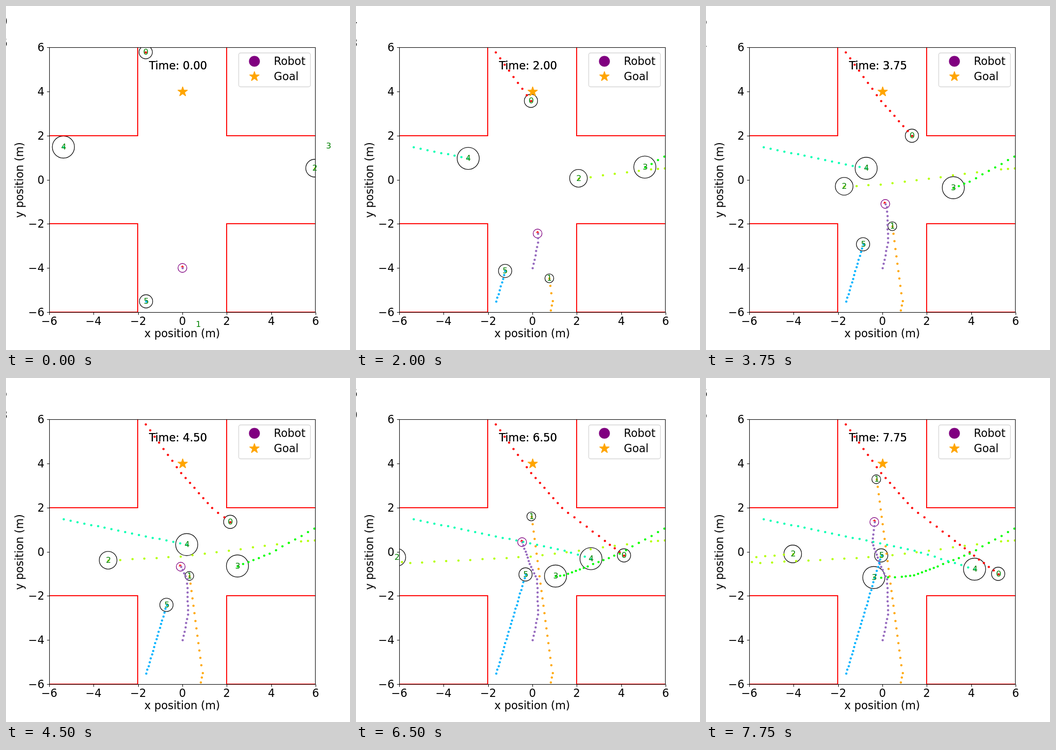
An HTML page with a canvas that plays this animation: 700x700 px, repeating every 8 s.

```html
<!DOCTYPE html>
<html lang="en">
<head>
<meta charset="utf-8">
<title>Crossing simulation</title>
<style>
  html, body { margin: 0; width: 100%; height: 100%; overflow: hidden; background: #fff; }
  canvas { display: block; width: 700px; height: 700px; }
</style>
</head>
<body>
<canvas id="stage" width="700" height="700"></canvas>
<script>
const ctx = document.getElementById('stage').getContext('2d');
const STEP = 250, STEPS = 32;
const LEFT = 88, TOP = 84, RIGHT = 629, BOTTOM = 623;
const sx = x => 359 + x * 45.17;
const sy = y => 353.5 - y * 44.92;

// Each agent walks straight between a few waypoints: [step, x, y].
const agent = (color, r, ...path) => ({ color, r, path });
const robot = agent('#9467bd', 9, [0, 359, 533], [6, 370, 481], [14, 368, 409],
  [18, 355.5, 384], [26, 338, 334], [31, 342.5, 293]);
const hue = h => `hsl(${h} 100% 50%)`;
const humans = [
  agent(hue(0), 13.5, [0, 284.3, 94], [8, 356, 193], [15, 419, 264], [22, 506, 331], [31, 594.5, 398.5]),
  agent(hue(39), 9, [0, 391, 648], [5, 399.5, 599.5], [31, 346.5, 206]),
  agent(hue(78), 18, [0, 628, 330], [2, 600, 332], [12, 354.5, 363], [22, 110, 376],
    [24, 75, 371], [26, 83, 365], [31, 176.5, 358]),
  agent(hue(120), 22.5, [0, 656, 285], [5, 627, 306], [12, 535.5, 357], [18, 471, 382.5],
    [24, 423, 401], [27, 397.5, 404], [31, 341.5, 406]),
  agent(hue(162), 22.5, [0, 116.8, 287], [22, 423.5, 350.5], [31, 546.5, 389]),
  agent(hue(198), 13.5, [0, 285, 601], [31, 356.5, 361])
];

function at({ path }, i) {
  const k = Math.max(1, path.findIndex(p => p[0] >= i));
  const [a, ax, ay] = path[k - 1], [b, bx, by] = path[k];
  const f = (i - a) / (b - a);
  return [ax + (bx - ax) * f, ay + (by - ay) * f];
}

function text(s, x, y, { size = 22.2, align = 'center', color = '#000' } = {}) {
  ctx.font = `${size}px "DejaVu Sans", sans-serif`;
  ctx.textAlign = align;
  ctx.fillStyle = color;
  ctx.fillText(s, x, y);
}

function line(color, width, ...pts) {
  ctx.strokeStyle = color;
  ctx.lineWidth = width;
  ctx.beginPath();
  pts.forEach(([x, y]) => ctx.lineTo(x, y));
  ctx.stroke();
}

function disc(x, y, r, fill) {
  ctx.fillStyle = fill;
  ctx.beginPath();
  ctx.arc(x, y, r, 0, 7);
  ctx.fill();
}

function ring(x, y, r, color) {
  ctx.strokeStyle = color;
  ctx.lineWidth = 1.35;
  ctx.beginPath();
  ctx.arc(x, y, r, 0, 7);
  ctx.stroke();
}

function star(x, y, r = 10.4) {
  ctx.fillStyle = ctx.strokeStyle = '#ffa500';
  ctx.lineWidth = 1.39;
  ctx.lineJoin = 'bevel';
  ctx.beginPath();
  for (let k = 0; k < 10; k++) {
    const a = k * Math.PI / 5, d = k % 2 ? r * 0.382 : r;
    ctx.lineTo(x + d * Math.sin(a), y - d * Math.cos(a));
  }
  ctx.closePath();
  ctx.fill();
  ctx.stroke();
  ctx.lineJoin = 'miter';
}

function walls() {
  for (const [x, edge] of [[268, LEFT], [449, RIGHT]]) {
    line('#f00', 2, [edge, 264], [x, 264], [x, TOP]);
    line('#f00', 2, [edge, 443], [x, 443], [x, BOTTOM], [edge, BOTTOM]);
  }
}

// Trail dots sit on pixel centres.
function trail(a, i) {
  for (let k = 0; k <= i; k++) {
    const [x, y] = at(a, k).map(v => Math.round(v) + 0.5);
    disc(x, y, 2.3, a.color);
  }
}

function arrow(i) {
  const [x, y] = at(robot, i);
  const [px, py] = i ? at(robot, i - 1) : [x, y + 1];
  ctx.save();
  ctx.translate(x, y);
  ctx.rotate(Math.atan2(x - px, py - y));
  line('#f00', 1.3, [0, -1], [0, -4]);
  line('#f00', 1.3, [-2.8, -1.6], [0, -4.4], [2.8, -1.6]);
  ctx.restore();
}

function axes() {
  ctx.strokeStyle = '#000';
  ctx.lineWidth = 1.1;
  ctx.strokeRect(LEFT + 0.5, TOP + 0.5, RIGHT - LEFT, BOTTOM - TOP);
  for (let v = -6; v <= 6; v += 2) {
    const s = String(v).replace('-', '\u2212');
    const x = Math.round(sx(v)), y = Math.round(sy(v));
    line('#000', 1.1, [x + 0.5, BOTTOM + 0.5], [x + 0.5, BOTTOM + 5.5]);
    line('#000', 1.1, [LEFT - 4.5, y + 0.5], [LEFT + 0.5, y + 0.5]);
    text(s, x, 649);
    text(s, 78, y + 8, { align: 'right' });
  }
  text('x position (m)', 358.5, 674);
  ctx.save();
  ctx.translate(35, 354);
  ctx.rotate(-Math.PI / 2);
  text('y position (m)', 0, 0);
  ctx.restore();
}

function legend() {
  ctx.beginPath();
  ctx.roundRect(473.5, 95.5, 146, 69, 4);
  ctx.fillStyle = 'rgba(255,255,255,.8)';
  ctx.fill();
  ctx.strokeStyle = '#d4d4d4';
  ctx.lineWidth = 1.35;
  ctx.stroke();
  disc(505.5, 112.5, 11.1, '#800080');
  star(505.5, 143.5);
  text('Robot', 545, 120, { align: 'left' });
  text('Goal', 545, 151, { align: 'left' });
}

// Two readouts of which only the last digit pokes in at the left edge.
function readouts(i) {
  text(Math.round(Math.min(6, 1.25 * Math.sqrt(i))), -11.3, 39, { align: 'left' });
  text((9 * i + 6) % 10, -11.3, 83, { align: 'left' });
}

function draw(i) {
  ctx.fillStyle = '#fff';
  ctx.fillRect(0, 0, 700, 700);

  ctx.save();
  ctx.beginPath();
  ctx.rect(LEFT, TOP, RIGHT - LEFT + 1, BOTTOM - TOP + 0.5);
  ctx.clip();
  humans.forEach(h => ring(...at(h, i), h.r, '#111'));
  ring(...at(robot, i), robot.r, '#800080');
  walls();
  [robot, ...humans].forEach(a => trail(a, i));
  star(359.5, 174.5);
  arrow(i);
  ctx.restore();

  axes();
  const time = 'Time: ' + (i * STEP / 1000).toFixed(2);
  for (let k = 0; k < 2; k++) text(time, 291, 129, { align: 'left' });
  humans.forEach((h, n) => {
    const [x, y] = at(h, i).map(Math.round);
    text(n, x + 0.5, y + 5, { size: 16.67, color: '#008000' });
  });
  legend();
  readouts(i);
}

let shown = -1;
function tick() {
  const i = Math.floor(performance.now() / STEP) % STEPS;
  if (i !== shown) draw(shown = i);
  requestAnimationFrame(tick);
}
tick();
</script>
</body>
</html>
```
